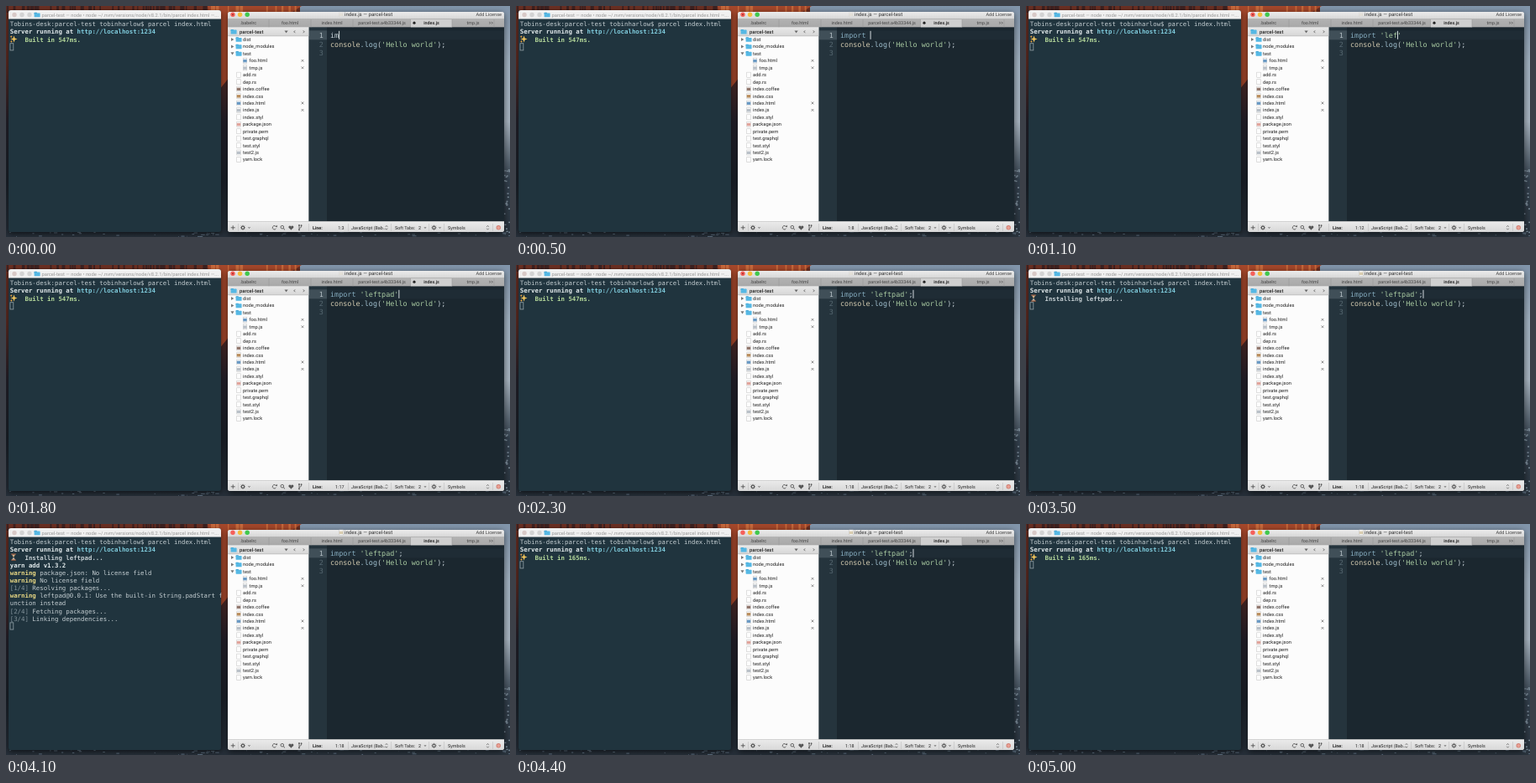
Animation of 600x276 px, one loop 5.1 s. Source, as an HTML page with a canvas:

```html
<!DOCTYPE html>
<html lang="en">
<head>
<meta charset="utf-8">
<title>Automatic install</title>
<style>
html, body { margin: 0; width: 100%; height: 100%; overflow: hidden; background: #20262c; }
canvas { display: block; width: 600px; height: 276px; }
</style>
</head>
<body>
<canvas id="stage" width="600" height="276"></canvas>
<script>
const ctx = document.getElementById('stage').getContext('2d');
const LOOP = 5100;
const UI = 'Roboto, "Liberation Sans", sans-serif';
const MONO = '"DejaVu Sans Mono", monospace';
const TERM = `7.38px ${MONO}`;
const CODE = `8.46px ${MONO}`;
ctx.textRendering = 'geometricPrecision';

// ---------- drawing helpers ----------
function box(x, y, w, h, fill) {
  ctx.fillStyle = fill;
  ctx.fillRect(x, y, w, h);
}
function rounded(x, y, w, h, r, fill) {
  ctx.fillStyle = fill;
  ctx.beginPath();
  ctx.roundRect(x, y, w, h, r);
  ctx.fill();
}
function dot(x, y, r, fill) {
  ctx.fillStyle = fill;
  ctx.beginPath();
  ctx.arc(x, y, r, 0, 7);
  ctx.fill();
}
function poly(fill, ...pts) {
  ctx.fillStyle = fill;
  ctx.beginPath();
  for (let i = 0; i < pts.length; i += 2) ctx.lineTo(pts[i], pts[i + 1]);
  ctx.closePath();
  ctx.fill();
}
function line(color, width, ...pts) {
  ctx.strokeStyle = color;
  ctx.lineWidth = width;
  ctx.beginPath();
  for (let i = 0; i < pts.length; i += 2) ctx.lineTo(pts[i], pts[i + 1]);
  ctx.stroke();
}
function ring(x, y, r, color, width, from = 0, to = 2 * Math.PI) {
  ctx.strokeStyle = color;
  ctx.lineWidth = width;
  ctx.beginPath();
  ctx.arc(x, y, r, from, to);
  ctx.stroke();
}
function shade(y0, y1, ...colors) {
  const g = ctx.createLinearGradient(0, y0, 0, y1);
  colors.forEach((c, i) => g.addColorStop(i / (colors.length - 1), c));
  return g;
}
function text(str, x, y, font, color, align = 'left') {
  ctx.font = font;
  ctx.fillStyle = color;
  ctx.textAlign = align;
  ctx.fillText(str, x, y);
}
// Draws consecutive [string, color, weight] runs.
function runs(parts, x, y, font) {
  for (const [str, color, weight = ''] of parts) {
    text(str, x, y, `${weight} ${font}`, color);
    x += ctx.measureText(str).width;
  }
}
function shadowed(x, y, w, h, blur, fill) {
  ctx.save();
  ctx.shadowColor = 'rgba(0,0,0,.6)';
  ctx.shadowBlur = blur;
  ctx.shadowOffsetY = 2;
  rounded(x, y, w, h, 3, fill);
  ctx.restore();
}

// ---------- wallpaper: sunlit cliff, pale sky, dark rocks ----------
const noise = n => Math.abs(Math.sin(n * 127.1) * 43758.5) % 1;
function wallpaper() {
  box(0, 0, 350, 276, shade(0, 276, '#6b2f22', '#5a2a22', '#23202a', '#1a2029', '#262f39'));
  box(350, 0, 250, 276, shade(0, 276, '#8195ab', '#a3b3c2', '#a9b6c2', '#33404d', '#2a343e'));
  poly('#a5472a', 240, 0, 352, 0, 336, 10, 266, 12, 266, 85, 254, 100);
  for (let i = 0; i < 60; i++) {
    const x = 350 * noise(i + 1);
    box(x, 0, 1 + 3 * noise(i + 90), 8, x > 240 ? '#c96a3c' : '#3d2120');
  }
  for (let i = 0; i < 70; i++)
    box(600 * noise(i + 200), 269 + 6 * noise(i + 300), 5 * noise(i + 400), 1, '#5f7080');
  for (let i = 0; i < 25; i++)
    box(592 + 7 * noise(i + 500), 190 + 80 * noise(i + 600), 2, 1.5, '#7f909e');
}

// ---------- small icons ----------
function folder(x, y) {
  rounded(x - 3.4, y - 2.8, 3.4, 2, .5, '#3a9fce');
  rounded(x - 3.4, y - 2.1, 7, 4.9, .6, '#56b8e4');
}
function page(x, y, mark) {
  box(x - 2.5, y - 3.3, 5, 6.6, '#c2c2c2');
  box(x - 2, y - 2.8, 4, 5.6, '#fdfdfd');
  if (mark) box(x - 2.2, y - 1.4, 4.4, 3.4, mark);
}
function updown(x, y) {
  line('#555', .7, x - 1.3, y - .9, x, y - 2.4, x + 1.3, y - .9);
  line('#555', .7, x - 1.3, y + .9, x, y + 2.4, x + 1.3, y + .9);
}
function chevron(x, y, dx, dy, color = '#666') {
  line(color, .8, x - dx - dy * 1.3, y - dy - dx * 1.3, x + dx, y + dy, x - dx + dy * 1.3, y - dy + dx * 1.3);
}
function gear(x, y) {
  ring(x, y, 1.7, '#555', 1.1);
  for (let i = 0; i < 8; i++) {
    const a = i * Math.PI / 4, c = Math.cos(a), s = Math.sin(a);
    line('#555', .8, x + 2 * c, y + 2 * s, x + 3 * c, y + 3 * s);
  }
}
function cross(x, y) {
  line('#666', .7, x - 1.4, y - 1.4, x + 1.4, y + 1.4);
  line('#666', .7, x - 1.4, y + 1.4, x + 1.4, y - 1.4);
}
function sparkle(x, y, r, color) {
  const pts = [];
  for (let i = 0; i < 8; i++) {
    const a = i * Math.PI / 4, d = i % 2 ? r * .36 : r;
    pts.push(x + d * Math.cos(a), y + d * Math.sin(a));
  }
  poly(color, ...pts);
}
function hourglass(x, y) {
  poly('#c4b3a4', x - 2.3, y - 3.3, x + 2.3, y - 3.3, x - 2.3, y + 3.3, x + 2.3, y + 3.3);
  poly('#d8a35c', x - 1.3, y - 1.8, x + 1.3, y - 1.8, x, y);
  box(x - 2.8, y - 4.1, 5.6, 1.2, '#a4603f');
  box(x - 2.8, y + 2.9, 5.6, 1.2, '#a4603f');
}

// ---------- terminal ----------
const PALE = '#c3cdd1', DIM = '#83939b', YELLOW = '#e6d683', WHITE = '#e0e8ea';
const termY = row => 24.3 + 9.14 * row;
const warn = msg => [['warning', YELLOW, 'bold'], [' ' + msg, PALE]];
const step = (n, msg) => [[`[${n}/4]`, DIM], [` ${msg}...`, PALE]];
const YARN = [
  [3700, [['yarn add v1.3.2', WHITE, 'bold']]],
  [3700, warn('package.json: No license field')],
  [3800, warn('No license field')],
  [3800, step(1, 'Resolving packages')],
  [3900, warn('leftpad@0.0.1: Use the built-in String.padStart f')],
  [3900, [['unction instead', PALE]]],
  [4000, step(2, 'Fetching packages')],
  [4100, step(3, 'Linking dependencies')]
];

function terminal(t) {
  shadowed(3, 5, 253, 265, 6, '#20343e');
  rounded(3, 5, 253, 10.5, [3, 3, 0, 0], '#f0f0f0');
  for (let i = 0; i < 3; i++) dot(10 + 9 * i, 10.5, 2.7, i ? '#d3d3d3' : '#d8c9c7');
  folder(37, 10.5);
  text('parcel-test — node • node ~/.nvm/versions/node/v8.2.1/bin/parcel index.html —...',
    42.5, 12.6, `5.8px ${UI}`, '#9a9a9a');

  ctx.save();
  ctx.beginPath();
  ctx.rect(3, 15, 253.5, 255);
  ctx.clip();
  const row = (n, parts) => runs(parts, 4.7, termY(n), TERM);
  row(0, [['Tobins-desk:parcel-test tobinharlow$ parcel index.html', PALE]]);
  row(1, [['Server running at ', WHITE, 'bold'], ['http://localhost:1234', '#7fcbdc', 'bold']]);

  const installing = t >= 3100 && t < 4200;
  let next = 3;
  if (installing) {
    hourglass(9, 39.6);
    row(2, [['    Installing leftpad...', PALE, 'bold']]);
    for (const [start, parts] of YARN) if (t >= start) row(next++, parts);
  } else {
    sparkle(9.5, 39.5, 4, '#f2c45a');
    sparkle(6.2, 36.8, 1.7, '#e9a645');
    sparkle(6.4, 42.4, 1.8, '#e9a645');
    row(2, [[`    Built in ${t < 3100 ? 547 : 165}ms.`, '#b5d99b', 'bold']]);
  }
  ctx.strokeStyle = '#93a2a8';
  ctx.lineWidth = .8;
  ctx.strokeRect(5, termY(next) - 7, 3.8, 8.2);
  ctx.restore();
}

// ---------- editor ----------
const SPLIT = 360.3, STATUS_TOP = 257.2;
const TABS = [
  ['.babelrc', 264, 313], ['foo.html', 313, 363], ['index.html', 363, 413],
  ['parcel-test.a4b33344.js', 413, 482], ['index.js', 482, 531], ['tmp.js', 531, 581]
];
const HTML_ICON = '#6a9ac4', JS_ICON = '#b9c0c8';
// name, kind, icon colour, open marker
const FILES = [
  ['dist', 'closed'], ['node_modules', 'closed'], ['test', 'open'],
  ['foo.html', 'nested', HTML_ICON, true], ['tmp.js', 'nested', JS_ICON, true],
  ['add.rs'], ['dep.rs'], ['index.coffee', '', '#92786e'], ['index.css', '', '#b98d5c'],
  ['index.html', '', HTML_ICON, true], ['index.js', '', JS_ICON, true], ['index.styl'],
  ['package.json', '', '#e0a49c'], ['private.pem'], ['test.graphql'], ['test.styl'],
  ['test2.js', '', JS_ICON], ['yarn.lock']
];
const SOURCE = "import 'leftpad';";
const KEYS = [100, 200, 300, 400, 500, 700, 900, 1000, 1100, 1200, 1300, 1400, 1500, 1700, 2000];
const SAVED = 2800, LAST_KEY = 2000;

function sidebar() {
  box(264, 25, SPLIT - 264, 234, '#fcfcfc');
  box(264, 25, SPLIT - 264, 11, shade(25, 36, '#e9e9e9', '#d6d6d6'));
  box(264, 35.6, SPLIT - 264, .6, '#b0b0b0');
  folder(271, 30.7);
  text('parcel-test', 278, 32.7, `500 5.9px ${UI}`, '#222');
  poly('#666', 331.5, 29.6, 335.7, 29.6, 333.6, 32.3);
  chevron(343.5, 30.7, -.9, 0);
  chevron(354.5, 30.7, .9, 0);
  FILES.forEach(([name, kind, mark, opened], i) => {
    const y = 40 + 8.44 * i, shift = kind === 'nested' ? 7.5 : 0;
    if (kind === 'closed') poly('#777', 268, y - 2, 271.4, y, 268, y + 2);
    if (kind === 'open') poly('#777', 267.5, y - 1.6, 271.5, y - 1.6, 269.5, y + 1.7);
    if (kind === 'closed' || kind === 'open') folder(277, y);
    else page(277 + shift, y, mark);
    text(name, 282 + shift, y + 2, `5.75px ${UI}`, '#222');
    if (opened) cross(353, y);
  });
}

function titleAndTabs(dirty) {
  rounded(264, 7, 329, 9, [3, 3, 0, 0], shade(5, 16, '#f0f0f0', '#d5d5d5'));
  ['#f5605a', '#f6bd3b', '#40c84c'].forEach((c, i) => dot(270 + 8.6 * i, 10.3, 2.7, c));
  if (dirty) dot(270, 10.3, .9, '#8d2420');
  ctx.globalAlpha = dirty ? .25 : 1;
  page(399, 10, '#d9cdb0');
  ctx.globalAlpha = 1;
  text('index.js — parcel-test', 403, 12, `6.1px ${UI}`, '#333');
  text('Add License', 590, 11.8, `5.6px ${UI}`, '#444', 'right');

  box(264, 15.5, 329, 9.8, shade(15, 25, '#b2b2b2', '#a9a9a9'));
  for (const [name, x0, x1] of TABS) {
    const active = name === 'index.js';
    if (active) box(x0, 16, x1 - x0, 9.3, '#cfcfcf');
    box(x1 - .3, 16, .6, 9.3, '#9a9a9a');
    text(name, (x0 + x1) / 2, 22.2, `${active ? 500 : 400} 5.4px ${UI}`, active ? '#1c1c1c' : '#444', 'center');
  }
  box(264, 15.3, 329, .5, '#a2a2a2');
  if (dirty) dot(486, 20.2, 1.6, '#222');
  chevron(576, 20.2, .9, 0);
  chevron(578.6, 20.2, .9, 0);
}

function codeArea(t, typed) {
  const keyword = '#86adc0', ident = '#d3cbb0', method = '#a3c3d2', string = '#a9cba2', punct = '#c6d1d7';
  box(SPLIT, 25, 593 - SPLIT, 234, '#1b272f');
  box(SPLIT, 25, 382 - SPLIT, 234, '#25343d');
  box(SPLIT, 29.3, 382 - SPLIT, 11, '#404f58');
  box(382, 29.3, 211, 11, '#1f2c35');
  for (let n = 1; n <= 3; n++)
    text(n, 377.8, 26.8 + 10.85 * n, CODE, n === 1 ? '#b0bbc1' : '#566770', 'right');

  const quoted = typed > 7;
  const literal = SOURCE.slice(7, Math.min(typed, 15)) + "'";
  runs([
    [SOURCE.slice(0, Math.min(typed, 7)), typed < 6 ? punct : keyword],
    [quoted ? literal : '', string],
    [typed > 16 ? ';' : '', punct]
  ], 386, 37.65, CODE);
  runs([
    ['console', ident], ['.log', method], ['(', punct], ["'Hello world'", string], [');', punct]
  ], 386, 48.5, CODE);

  const caretOn = t < LAST_KEY || (t - LAST_KEY) % 1100 < 550;
  if (caretOn) {
    ctx.font = CODE;
    box(386 + ctx.measureText(SOURCE.slice(0, typed)).width, 29.8, .9, 10, '#e6edf0');
  }
}

function statusBar(typed) {
  const font = `5.4px ${UI}`;
  rounded(264, STATUS_TOP, 329, 270 - STATUS_TOP, [0, 0, 3, 3], shade(257, 270, '#ececec', '#d8d8d8'));
  box(264, STATUS_TOP, 329, .5, '#b5b5b5');
  for (const x of [276, SPLIT, 407, 458, 503, 521, 579]) box(x, 260, .5, 9, '#b8b8b8');
  line('#555', .9, 267.7, 264.8, 272.7, 264.8);
  line('#555', .9, 270.2, 262.3, 270.2, 267.3);
  gear(282, 264.8);
  chevron(289.5, 264.8, 0, .8);

  ring(319.5, 264.8, 2.2, '#555', .9, .5, 5.6);
  poly('#555', 320.6, 263.8, 323, 264.3, 322.6, 261.8);
  ring(328.8, 264.2, 1.8, '#555', .9);
  line('#555', 1, 330.1, 265.5, 332, 267.4);
  dot(338, 264, 1.6, '#555');
  dot(340.8, 264, 1.6, '#555');
  poly('#555', 336.6, 264.6, 342.2, 264.6, 339.4, 267.7);
  line('#555', .8, 349, 262, 349, 267.6);
  line('#555', .8, 349, 265.8, 351.6, 264.2, 351.6, 262.4);
  for (const [x, y] of [[349, 262], [349, 267.4], [351.6, 262.2]]) dot(x, y, .9, '#555');

  text('Line:', 365, 266.8, `bold ${font}`, '#222');
  text(`1:${typed + 1}`, 402.5, 266.8, font, '#222', 'right');
  text('JavaScript (Bab…', 411, 266.8, font, '#222');
  updown(453, 264.8);
  text('Soft Tabs:', 463, 266.8, font, '#222');
  text('2', 491, 266.8, font, '#222');
  chevron(499, 264.8, 0, .8);
  gear(509.5, 264.8);
  chevron(516.5, 264.8, 0, .8);
  text('Symbols', 526, 266.8, font, '#222');
  updown(573.5, 264.8);
  dot(586.3, 264.8, 2.7, '#cf7e72');
  dot(586.3, 264.8, 1.9, '#e9a195');
}

function editor(t) {
  const typed = 2 + KEYS.filter(k => k <= t).length;
  shadowed(264, 7, 329, 263, 9, '#ddd');
  codeArea(t, typed);
  sidebar();
  titleAndTabs(t < SAVED);
  statusBar(typed);
}

// ---------- playback ----------
function draw(now) {
  const t = Math.floor(now % LOOP / 100) * 100;
  wallpaper();
  terminal(t);
  editor(t);
}
const start = performance.now();
function tick() {
  draw(performance.now() - start);
  requestAnimationFrame(tick);
}
tick();
</script>
</body>
</html>
```
